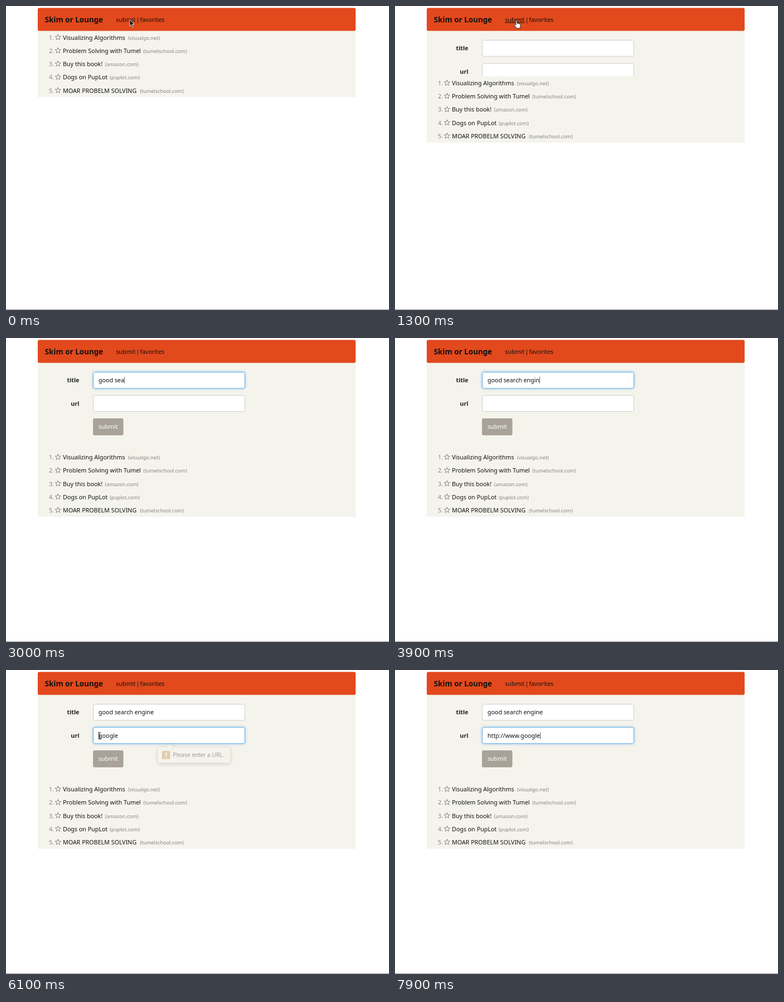
Animation, 700 px wide and 556 px high, one loop 8000 ms. Source, as an HTML page:

```html
<!DOCTYPE html>
<html lang="en">
<head>
<meta charset="utf-8">
<title>Link list</title>
<style>
  html, body { margin: 0; width: 100%; height: 100%; overflow: hidden; background: #fff; }
  svg { display: block; width: 700px; height: 556px; }
  text { font: 10.9px "Noto Sans", "Open Sans", sans-serif; fill: #111; white-space: pre; }
  .brand { font-size: 13.7px; font-weight: 700; }
  .label { font-weight: 700; text-anchor: end; fill: #222; }
  .site { font-size: 9.2px; fill: #828282; }
  .num { fill: #828282; }
  .star { fill: none; stroke: #777; stroke-width: .9; stroke-linejoin: round; }
  .field { fill: #fff; stroke: #ccc; }
  .field.focus { stroke: #66afe9; filter: drop-shadow(0 0 2.5px rgba(102, 175, 233, .75)); }
  .button { fill: #a9a299; }
  .button.hover { fill: #92897e; }
  .tip { font: 10.2px Inter, "Liberation Sans", sans-serif; fill: #333; }
  .bubble { fill: #f6f4ed; stroke: #c9c5b8; stroke-width: .7; filter: drop-shadow(0 2px 3px rgba(0, 0, 0, .3)); }
  .ink { fill: #111; stroke: #fff; stroke-width: .8; stroke-linejoin: round; }
  .glove { fill: #fff; stroke: #111; stroke-width: .9; stroke-linejoin: round; }
</style>
</head>
<body>
<svg viewBox="0 0 700 556">
  <defs><clipPath id="reveal"><rect id="opening" x="58" y="45" width="581" height="0"/></clipPath></defs>
  <rect id="panel" x="58" y="40" width="581" height="126.5" fill="#f5f4ec"/>
  <rect x="58" y="3.5" width="581" height="42" rx="3" fill="#e2491c"/>
  <text class="brand" x="71" y="30">Skim or Lounge</text>
  <text x="201" y="28.5">submit</text>
  <text x="238" y="28.5">|</text>
  <text x="245" y="28.5">favorites</text>
  <path id="underline" d="M201 30.5h35.5" stroke="#111"/>

  <g clip-path="url(#reveal)">
    <text class="label" x="134" y="80.5">title</text>
    <text class="label" x="134" y="123.5">url</text>
    <rect id="titleBox" class="field" x="159.5" y="62.5" width="277" height="29.5" rx="3"/>
    <rect id="urlBox" class="field" x="159.5" y="105" width="277" height="29.5" rx="3"/>
    <text id="titleText" x="169" y="80.5"></text>
    <text id="urlText" x="169" y="123.5"></text>
    <path id="caret" d="M.5 0v12" stroke="#555"/>
    <rect id="button" class="button" x="159" y="147" width="55.5" height="31" rx="3"/>
    <text x="186.7" y="166" text-anchor="middle" style="fill:#fff">submit</text>
  </g>

  <g id="list"></g>

  <g id="tooltip">
    <path class="bubble" d="M282 141h10.500l6.500-6 6.500 6h99.500q5 0 5 5v19q0 5-5 5h-123q-5 0-5-5v-19q0-5 5-5z"/>
    <rect x="285" y="148" width="15" height="15" rx="1.500" fill="#c99c62"/>
    <path d="M292.500 150.500v6.500m0 1.700v2" stroke="#fff" stroke-width="2"/>
    <text class="tip" x="305" y="159.300">Please enter a URL.</text>
  </g>

  <path d="M0 555.500h700" stroke="#8a8a8a"/>

  <g id="pointer">
    <path id="arrow" class="ink" d="M0 0v11.500l2.700-2.500 2 4.700 2-.9-2-4.500h3.600z"/>
    <path id="hand" class="glove" d="M-1 .8q1.200-1.600 2.300 0l.7 4.200q1.300-.8 2 .3 1.300-.6 1.900.5 1.500-.5 1.800 1l.2 2.700-1.300 4.500h-6l-1.800-3.200-2.700-3.300q.3-1.700 2-.8l1.500 1.300z"/>
    <path id="beam" d="M-2.700-6q2.400 0 2.700 1.300q.3-1.300 2.700-1.300M0-4.700v9.400M-2.700 6q2.400 0 2.700-1.300q.3 1.300 2.700 1.300M-1.500 1h3" fill="none" stroke="#333"/>
  </g>
</svg>
<script>
const LOOP = 8000, STEP = 100, FORM_HEIGHT = 160.5;
const $ = id => document.getElementById(id);
const clamp = v => Math.max(0, Math.min(1, v));
const show = (id, on) => $(id).setAttribute('visibility', on ? 'visible' : 'hidden');

// title, x of the site name, site name
const stories = [
  ['Visualizing Algorithms', 223, 'visualgo.net'],
  ['Problem Solving with Tumel', 251, 'tumelschool.com'],
  ['Buy this book!', 181, 'amazon.com'],
  ['Dogs on PupLot', 189.5, 'puplot.com'],
  ['MOAR PROBELM SOLVING', 245, 'tumelschool.com']
];

// time, x, y of the pointer's hot spot
const track = [
  [0, 226, 25], [500, 221.5, 27], [1500, 221.5, 27], [1900, 198, 79],
  [4600, 198, 79], [5000, 171, 152], [5400, 171, 152], [5900, 171, 120], [LOOP, 171, 120]
];

// moments that restart the caret's blinking
const actions = [1900, 4000, 4100, 4500, 5200, 6000, 7500, 7700];

function starPath(cx, cy) {
  const points = Array.from({ length: 10 }, (_, i) => {
    const r = i % 2 ? 2.3 : 5.5, a = i * Math.PI / 5 - Math.PI / 2;
    return (cx + r * Math.cos(a)).toFixed(2) + ' ' + (cy + r * Math.sin(a)).toFixed(2);
  });
  return 'M' + points.join('L') + 'z';
}

$('list').innerHTML = stories.map(([title, x, site], i) => {
  const y = 61.5 + i * 24.25;
  return `<text class="num" x="78.500" y="${y}">${i + 1}.</text>
    <path class="star" d="${starPath(95, y - 4.2)}"/>
    <text x="104" y="${y}">${title}</text>
    <text class="site" x="${x}" y="${y}">(${site})</text>`;
}).join('');

function typed(text, start, step, t) {
  return text.slice(0, Math.max(0, Math.floor((t - start) / step) + 1));
}

function pointerAt(t) {
  const i = track.findIndex(k => k[0] > t);
  const [t0, x0, y0] = track[i - 1], [t1, x1, y1] = track[i];
  const p = (1 - Math.cos(Math.PI * (t - t0) / (t1 - t0))) / 2;
  return [x0 + (x1 - x0) * p, y0 + (y1 - y0) * p];
}

function drawForm(t) {
  const p = clamp((t - 1095) / 400);
  const open = FORM_HEIGHT * (1 - Math.cos(p * Math.PI)) / 2;
  $('opening').setAttribute('height', open);
  $('panel').setAttribute('height', 126.5 + open);
  $('list').setAttribute('transform', `translate(0 ${open})`);
}

function drawFields(t) {
  const prefix = typed('http://www.', 6500, 100, t);
  $('titleText').textContent = typed('good search engine', 2300, 100, t);
  $('urlText').textContent = prefix + typed('google', 4200, 60, t);

  const onUrl = t >= 4100;
  $('titleBox').classList.toggle('focus', t >= 1900 && !onUrl);
  $('urlBox').classList.toggle('focus', onUrl);

  const text = $(onUrl ? 'urlText' : 'titleText');
  const inFront = t >= 6000 && t < 7700;
  const count = inFront ? prefix.length : text.textContent.length;
  const width = count ? text.getSubStringLength(0, count) : 0;
  $('caret').setAttribute('transform', `translate(${Math.round(169 + width)} ${onUrl ? 114 : 71})`);

  const typing = (t >= 2300 && t < 4000) || (t >= 6500 && t < 7500);
  const last = actions.filter(a => a <= t).pop();
  show('caret', t >= 1900 && (typing || (t - last) % 1000 < 500));
}

function drawPointer(t) {
  const [x, y] = pointerAt(t);
  const within = (x0, y0, x1, y1) => x >= x0 && x <= x1 && y >= y0 && y <= y1;
  const formOpen = t >= 1500;
  const onLink = t >= 200 && within(201, 17, 237, 33);
  const onButton = formOpen && within(159, 147, 214, 178);
  const onField = formOpen && (within(159, 62, 437, 92) || within(159, 104, 437, 135));
  const visible = t < 2300 || (t >= 4700 && t < 6500);
  const kind = onLink || onButton ? 'hand' : onField ? 'beam' : 'arrow';

  $('pointer').setAttribute('transform', `translate(${x.toFixed(1)} ${y.toFixed(1)})`);
  for (const id of ['arrow', 'hand', 'beam']) show(id, visible && id === kind);
  show('underline', onLink);
  $('button').classList.toggle('hover', visible && onButton);
}

function draw(t) {
  drawForm(t);
  drawFields(t);
  drawPointer(t);
  $('tooltip').setAttribute('opacity', Math.min(clamp((t - 5200) / 200), clamp((6264 - t) / 364)));
}

const begin = performance.now();
function tick() {
  const t = (performance.now() - begin) % LOOP;
  draw(Math.floor(t / STEP) * STEP);
  requestAnimationFrame(tick);
}
tick();
</script>
</body>
</html>
```
